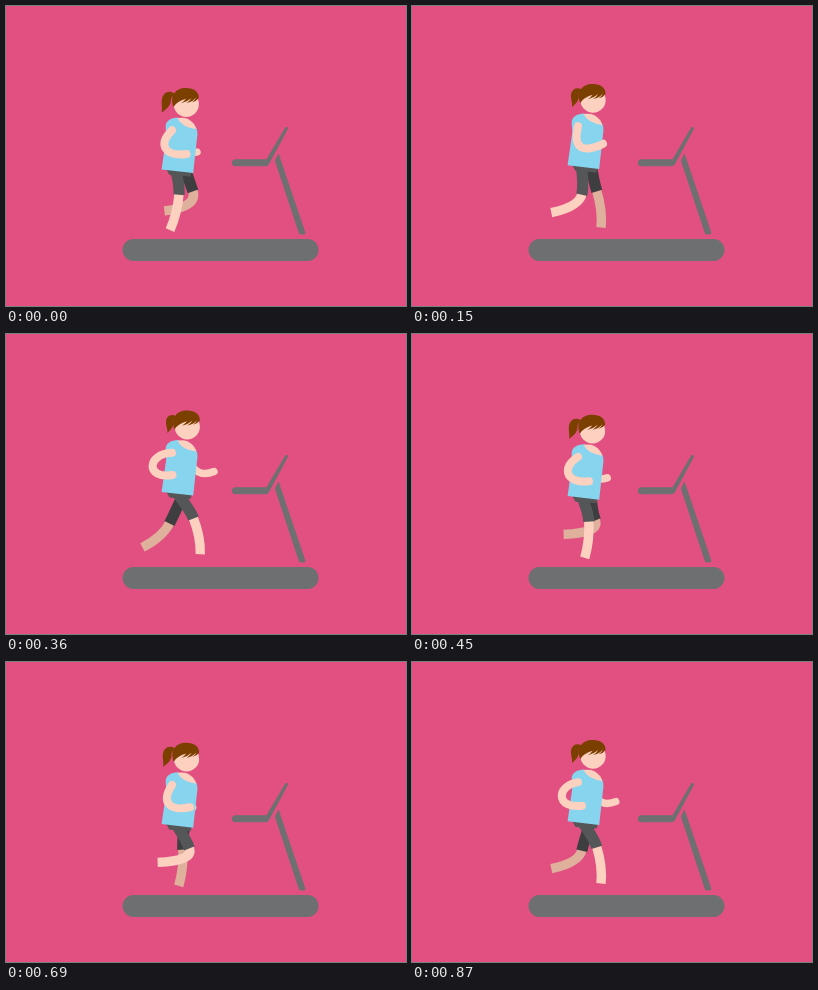
Animation, 400 px wide and 300 px high, one loop 900 ms. Source, as an HTML page:

```html
<!DOCTYPE html>
<html lang="en">
<head>
<meta charset="utf-8">
<title>Treadmill</title>
<style>
html, body { margin: 0; width: 100%; height: 100%; overflow: hidden; background: #e25081; }
svg { display: block; width: 100vw; height: 100vh; }
.skin { fill: #fcd1c0; }
.hair { fill: #7b3f00; }
.limb { fill: none; stroke: #fcd1c0; }
.arm { stroke-width: 8; stroke-linecap: round; }
.shin { stroke-width: 9.4; }
.thigh { fill: none; stroke: #555658; stroke-width: 11.2; }
</style>
</head>
<body>
<svg viewBox="0 0 400 300">
  <rect width="400" height="300" fill="#e25081"/>
  <g fill="#6e6f71">
    <rect x="116.5" y="233" width="196" height="22" rx="11"/>
    <path d="M229.5 153.2H260.5L278.9 122Q280.2 120.3 281.6 121.3Q282.3 122 281.7 123.2L263.4 157.5Q262 160.3 259.5 160.3H229.5A3.5 3.5 0 0 1 229.5 153.2Z"/>
    <path d="M272.6 147.5L268.8 154.6L292.6 226.5Q293.2 228.5 295 228.5H297.5Q299.8 228.2 299.2 226Z"/>
  </g>
  <path id="farArm" class="limb arm" style="stroke-width:7.4"/>
  <path id="farShin" class="limb shin" style="stroke:#dfb19c"/>
  <path id="farThigh" class="thigh" style="stroke:#3e3e40"/>
  <path id="nearShin" class="limb shin"/>
  <path id="nearThigh" class="thigh"/>
  <g id="body">
    <path fill="#555658" d="M159 161L186.500 164L184.500 170.500L163.500 169Z"/>
    <path fill="#87d4ef" d="M172 111.500C165 111.500 160 115 159.700 120C159.500 124 160.600 127 160.200 131L155.600 163.400L187.200 167.100L191.500 128Q191.600 124 190 121.500Z"/>
    <path class="skin" d="M171.500 112.200Q177 111 182 113Q189 117 190.300 123Q176 121.500 171.500 112.200Z"/>
  </g>
  <g id="head">
    <path id="pony" class="hair" d="M168.500 87.500C163 84 156.500 86 155.700 95C155.400 100 156.500 102 155.600 106.500C161 103 165 99 164.800 94.500C164.800 92 167 90 168.500 87.500Z"/>
    <circle class="skin" cx="180.300" cy="98.300" r="12.600"/>
    <path class="hair" d="M167.500 101C163.500 90 169 82 180 82C188 82 193.200 86 192.800 92Q190.500 95.300 186 96.300Q189 94 190.300 91.500Q186 96 180.500 97Q184 94.500 185.500 92Q181 96 175 97.300Q178.500 95 180 92.800Q170.500 95.500 167.500 101Z"/>
  </g>
  <path id="nearArm" class="limb arm"/>
</svg>
<script>
const STRIDE = 16, FRAMES = 30, STEP = 30;
const DEG = Math.PI / 180;

// Eight evenly spaced key poses of one stride
const kneeX = [173, 169, 163.5, 178, 187, 186, 187.5, 181];
const shinTilt = [14, 38, 48, 66, 54, -3, -11, 0];

const $ = id => document.getElementById(id);
const set = (id, d) => $(id).setAttribute('d', d);
const move = (id, how) => $(id).setAttribute('transform', how);

// Linear wave: 1 at phase 0, -1 half a period later
const triangle = (phase, period) => {
  const u = (phase / period % 1 + 1) % 1;
  return Math.abs(4 * u - 2) - 1;
};

// Smooth closed curve through evenly spaced keys
function spline(keys, phase) {
  const n = keys.length, x = phase / STRIDE * n, i = Math.floor(x), u = x - i;
  const [a, b, c, d] = [-1, 0, 1, 2].map(k => keys[(i + k + n) % n]);
  return b + u / 2 * (c - a + u * (2 * a - 5 * b + 4 * c - d + u * (3 * (b - c) + d - a)));
}

function drawLeg(name, phase, hipX, lift) {
  const x = spline(kneeX, phase);
  const y = 187 + 3 * Math.cos((phase - 2.5) / STRIDE * 2 * Math.PI);
  const tilt = spline(shinTilt, phase);
  const flex = tilt + Math.atan2(x - 174, 26) / DEG;
  const bulge = Math.max(1, flex / 4);
  const len = 38 - bulge * 0.15;
  const dx = -Math.sin(tilt * DEG) * len, dy = Math.cos(tilt * DEG) * len;
  const bx = dx / 2 + bulge, by = dy / 2 + bulge * 0.3;
  const k = 10 / Math.hypot(bx, by);
  set(name + 'Shin', `M${x - bx * k / 10} ${y - by * k / 10}q${bx} ${by} ${dx} ${dy}`);
  set(name + 'Thigh', `M${hipX} ${162 - lift}Q${x - bx * k} ${y - by * k} ${x} ${y}`);
}

const drawArm = (id, x, y, ...curve) => set(id, `M${x} ${y}C${curve.join(' ')}`);

function draw(ms) {
  const phase = Math.floor(ms / STEP) % FRAMES % STRIDE;
  const rise = (1 - triangle(phase, STRIDE / 2)) / 2;
  const swing = triangle(phase - STRIDE / 4, STRIDE);
  const lift = 5.5 * rise;

  drawLeg('far', (phase + STRIDE / 2) % STRIDE, 179, lift);
  drawLeg('near', phase, 169, lift);

  drawArm('nearArm', 166, 124.3,
    152 + 11 * swing, 138 + 13 * swing,
    158 + 19 * swing, 151,
    180.5 + 14 * swing, 148 - 4 * swing - 5.5 * swing * swing);
  drawArm('farArm', 180, 122,
    168 - 14 * swing, 134,
    172 - 18 * swing, 151,
    191 - 17 * swing, 146 + 3 * swing);

  for (const id of ['body', 'nearArm', 'farArm']) move(id, `translate(0 ${-lift})`);
  move('head', `translate(${rise} ${-lift})`);
  move('pony', `translate(168 87) rotate(${-9 * rise}) scale(${1 - 0.18 * rise}) translate(-168 -87)`);
}

const start = performance.now();
function tick() {
  draw(performance.now() - start);
  requestAnimationFrame(tick);
}
tick();
</script>
</body>
</html>
```
